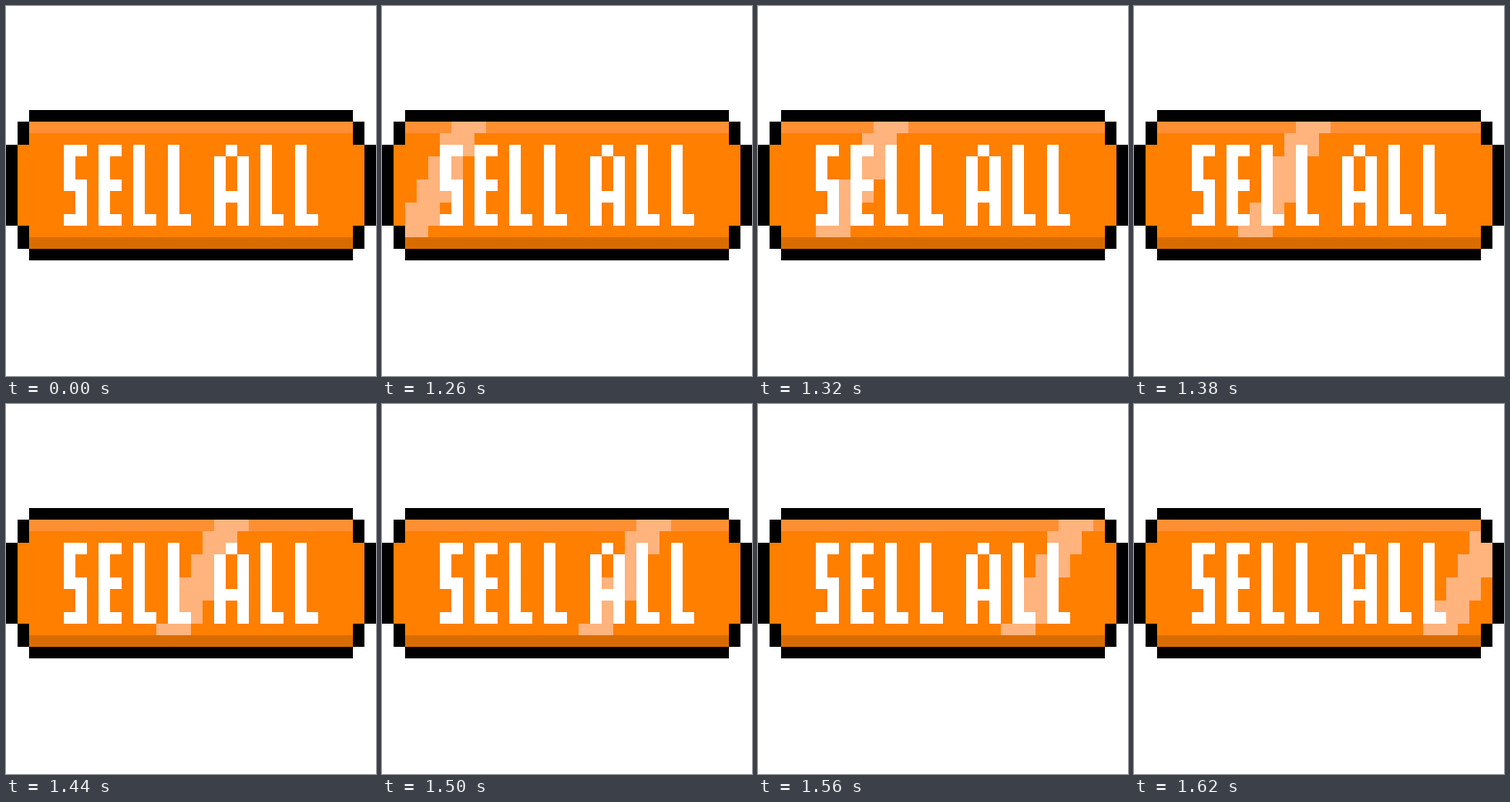
An HTML page with a canvas for the animation above (1.68 s loop, 384 by 384 pixels).

```html
<!DOCTYPE html>
<html lang="en">
<head>
<meta charset="utf-8">
<title>Sell all button</title>
<style>
  html, body { margin: 0; width: 100%; height: 100%; overflow: hidden; background: #fff; }
  canvas { display: block; }
</style>
</head>
<body>
<canvas id="stage" width="384" height="384" role="img" aria-label="SELL ALL"></canvas>
<script>
const ctx = document.getElementById('stage').getContext('2d');
const CELL = 12, LOOP = 1680, SHINE_START = 1260, STEP = 60;

// Pixel lettering, 7 cells high
const LABEL = [
  '## ## #  #   #  #  #',
  '#  #  #  #  # # #  #',
  '#  #  #  #  # # #  #',
  '## ## #  #  # # #  #',
  ' # #  #  #  ### #  #',
  ' # #  #  #  # # #  #',
  '## ## ## ## # # ## ##'
].map(row => row.replace(/^(.{11})/, '$1'));

function block(color, x, y, w, h) {
  ctx.fillStyle = color;
  ctx.fillRect(x * CELL, y * CELL, w * CELL, h * CELL);
}

function drawButton() {
  block('#fff', 0, 0, 32, 32);
  block('#000', 2, 9, 28, 13);
  block('#000', 1, 10, 30, 11);
  block('#000', 0, 12, 32, 7);
  block('#ff7f00', 2, 10, 28, 11);
  block('#ff7f00', 1, 12, 30, 7);
  block('#ff8f33', 2, 10, 28, 1);
  block('#d96c00', 2, 20, 28, 1);
}

// Slanted band, three cells wide, kept inside the button
function drawShine(step) {
  for (let row = 0; row < 10; row++) {
    const left = 6 + 4 * step - Math.ceil(row / 2);
    const edge = row >= 2 && row <= 8 ? 31 : 30;
    const from = Math.max(left, 2), to = Math.min(left + 3, edge);
    if (to > from) block('#ffb37d', from, 10 + row, to - from, 1);
  }
}

function drawLabel() {
  LABEL.forEach((line, row) => [...line].forEach((mark, col) => {
    if (mark === '#') block('#fff', 5 + col + (col > 11 ? 1 : 0), 12 + row, 1, 1);
  }));
}

function frame(now) {
  const t = now % LOOP;
  drawButton();
  if (t >= SHINE_START) drawShine(Math.floor((t - SHINE_START) / STEP));
  drawLabel();
  requestAnimationFrame(frame);
}
frame(performance.now());
</script>
</body>
</html>
```
